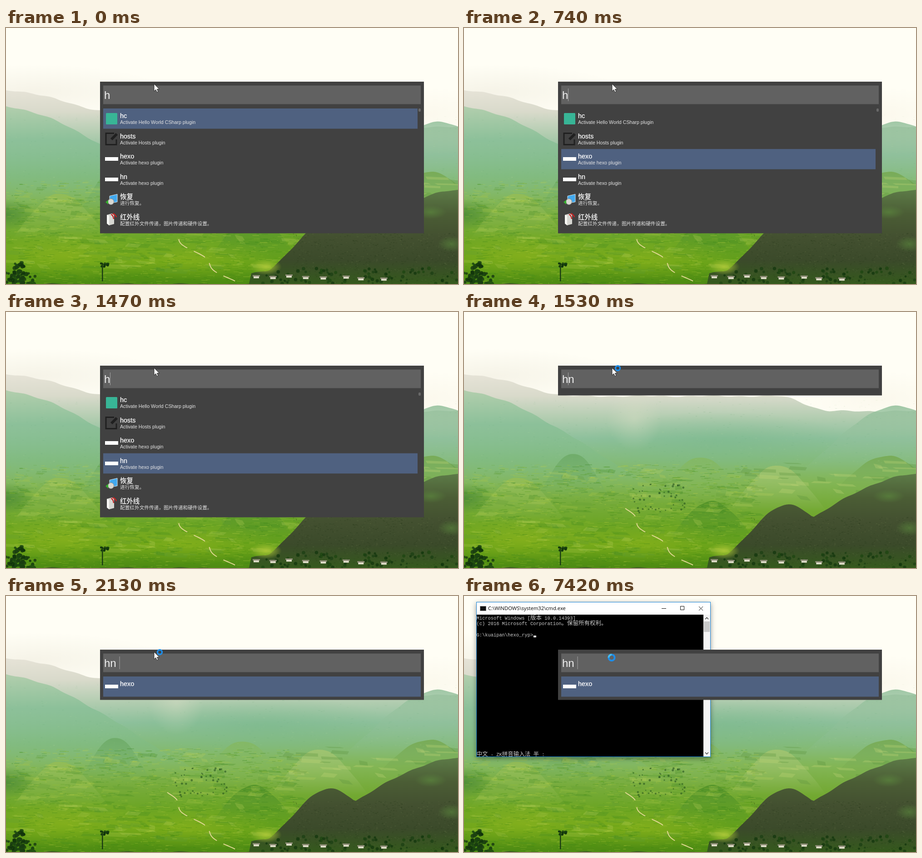
Animation, 995 px wide and 563 px high, one loop 8000 ms. Source, as an HTML page with a canvas:

```html
<!DOCTYPE html>
<html lang="zh">
<head>
<meta charset="utf-8">
<title>Launcher</title>
<style>
  html, body { margin: 0; width: 100%; height: 100%; overflow: hidden; background: #fffef4; }
  canvas, svg { position: absolute; left: 0; top: 0; width: 995px; height: 563px; }
  text { font-family: "Liberation Sans", "Noto Sans CJK SC", "Noto Sans CJK", sans-serif; fill: #fff; white-space: pre; }
  .query { font-size: 24px; fill: #efefef; }
  .title { font-size: 14.4px; stroke: #fff; stroke-width: .25px; }
  .sub { font-size: 10.67px; fill: #e4e4e4; }
  .mono { font-family: "Liberation Mono", "Noto Sans CJK SC", "Noto Sans CJK", monospace; font-size: 10.4px; fill: #ccc; }
  .mono .wide { font-size: 12.5px; }
  .caption { font-family: "Open Sans", "Noto Sans", sans-serif; font-size: 11.2px; fill: #000; }
</style>
</head>
<body>
<canvas id="land" width="995" height="563"></canvas>
<svg viewBox="0 0 995 563">
  <defs>
    <filter id="shadow" x="-10%" y="-10%" width="120%" height="120%">
      <feDropShadow dx="0" dy="3" stdDeviation="6" flood-color="#000" flood-opacity=".4"/>
    </filter>
  </defs>

  <g id="console">
    <rect x="27" y="13" width="516" height="341" fill="#1883d7" filter="url(#shadow)"/>
    <rect x="28" y="14" width="514" height="339" fill="#fff"/>
    <rect x="28" y="41" width="499" height="312"/>
    <rect x="35.5" y="22.5" width="13" height="10" fill="#111" stroke="#888"/>
    <text class="caption" x="53" y="31">C:\WINDOWS\system32\cmd.exe</text>
    <path d="M435 27.5h10M476.5 22.5h8v8h-8zM517 23l9 9m0-9l-9 9" fill="none" stroke="#111"/>
    <rect x="527" y="41" width="15" height="312" fill="#f5f5f5"/>
    <rect x="528" y="56" width="13" height="23" fill="#c9c9c9"/>
    <path d="M531 51l3.5-3.5 3.5 3.5M531 344l3.5 3.5 3.5-3.5" fill="none" stroke="#505050" stroke-width="1.6"/>
    <g id="lines"></g>
    <rect x="153" y="87" width="6" height="4" fill="#eee"/>
    <g id="ime"></g>
  </g>

  <rect id="panel" x="207" y="118" width="713" fill="#414141"/>
  <rect x="214" y="126.5" width="699" height="41" fill="#616161"/>
  <text id="query" class="query" x="216" y="156"></text>
  <rect id="caret" y="133" width="1" height="28" fill="#a5a5a5"/>
  <rect id="mark" x="214" height="44.5" fill="#4f6180"/>
  <g id="menu">
    <rect x="908" y="177" width="5" height="7" rx="2" fill="#696969"/>
    <rect x="220" y="187" width="25" height="25" rx="1.5" fill="#38b596"/>
    <g stroke="#202020" fill="none">
      <path d="M238 231.5H220v25h23V245" stroke-width="3"/>
      <path d="M232 245l12-12" stroke-width="6"/>
    </g>
    <path d="M228 369.5l17-4v17l-17 3z" fill="#42a9ee" stroke="#dce4e8"/>
    <circle cx="231" cy="382" r="6.5" fill="#d8d8d2" stroke="#888"/>
    <path d="M219 383l6-5v10z" fill="#35b02d"/>
    <path d="M222 411l11-3 5 3v20l-11 3-5-4z" fill="#d7d7d2"/>
    <path d="M222 411l5 2v21l-5-4z" fill="#f7f7f4"/>
    <path d="M231 410q5 1 6 10M235 408q6 2 8 8" fill="none" stroke="#c22525" stroke-width="2.5"/>
  </g>
  <g id="single"></g>

  <path id="arrow" d="M326 123v16l3.7-3.4 2.6 5.6 2.6-1.2-2.5-5.4h5z" fill="#fff" stroke="#222" stroke-width=".9"/>
  <circle id="busySmall" cx="338.5" cy="123.5" r="5" fill="none" stroke="#1e8de8" stroke-width="3.4"/>
  <g id="busyLarge" fill="none" stroke-width="4">
    <circle cx="325" cy="135.5" r="6.6" stroke="#1e8de8"/>
    <path d="M318.4 135.5a6.6 6.6 0 0 1 6.6-6.6" stroke="#45bdf3"/>
  </g>
</svg>

<script>
const LOOP = 8000;
const WIDTH = 995, HEIGHT = 563;
const ROW_TOP = 177, ROW_STEP = 44.57;
const $ = id => document.getElementById(id);

// ---- Landscape, painted once ----
const ctx = $('land').getContext('2d');
let seed = 7;
const rand = (a = 0, b = 1) => {
  seed = (seed * 16807) % 2147483647;
  return a + (b - a) * seed / 2147483647;
};
const pick = list => list[Math.floor(rand() * list.length)];
const smooth = x => {
  const k = Math.min(1, Math.max(0, x));
  return k * k * (3 - 2 * k);
};

// Fills everything below a ridge line with colours spread evenly from top to bottom.
function ridge(line, top, bottom, colors) {
  const fill = ctx.createLinearGradient(0, top, 0, bottom);
  colors.forEach((c, i) => fill.addColorStop(i / (colors.length - 1), c));
  ctx.fillStyle = fill;
  ctx.beginPath();
  ctx.moveTo(0, HEIGHT);
  for (let x = 0; x <= WIDTH; x += 5) ctx.lineTo(x, line(x) + Math.sin(x / 9) + Math.sin(x / 23));
  ctx.lineTo(WIDTH, HEIGHT);
  ctx.fill();
}

// A bell-shaped hill that melts into the land below.
function hill(center, top, spread, color, depth = 100) {
  const line = x => top + 200 * (1 - Math.exp(-(((x - center) / spread) ** 2)));
  ridge(line, top, top + depth, [color + 'dd', color + '66', color + '00']);
}

function glow(x, y, rx, ry, color, alpha = '88') {
  ctx.save();
  ctx.translate(x, y);
  ctx.scale(rx, ry);
  const fill = ctx.createRadialGradient(0, 0, 0, 0, 0, 1);
  fill.addColorStop(0, color + alpha);
  fill.addColorStop(1, color + '00');
  ctx.fillStyle = fill;
  ctx.fillRect(-1, -1, 2, 2);
  ctx.restore();
}

function scatter(count, left, top, right, bottom, colors, alpha, paint) {
  ctx.globalAlpha = alpha;
  for (let i = 0; i < count; i++) {
    ctx.fillStyle = pick(colors);
    paint(rand(left, right), rand(top, bottom));
  }
  ctx.globalAlpha = 1;
}

const dash = length => (x, y) => ctx.fillRect(x, y, rand(1, length), rand(.7, 1.8));
const leaf = size => (x, y) => {
  ctx.beginPath();
  ctx.arc(x, y, rand(size / 2, size), 0, 7);
  ctx.fill();
};

function field(x, y) {
  const w = rand(12, 50), h = rand(3, 13), lean = rand(-10, 10);
  ctx.beginPath();
  ctx.moveTo(x + lean, y);
  ctx.lineTo(x + w + lean, y + h * .3);
  ctx.lineTo(x + w, y + h);
  ctx.lineTo(x, y + h * .8);
  ctx.fill();
}

function house(x, y) {
  ctx.fillStyle = '#e1dfcb';
  ctx.fillRect(x - 6, y, 12, 5);
  ctx.fillStyle = '#8f8d78';
  ctx.fillRect(x - 8, y - 2, 16, 3);
}

function trail() {
  ctx.strokeStyle = '#e0d794';
  ctx.lineWidth = 2;
  ctx.setLineDash([28, 16]);
  ctx.beginPath();
  for (let s = 0; s <= 1; s += .02)
    ctx.lineTo(355 + 150 * s ** 1.2 + 9 * Math.sin(14 * s), 432 + 130 * s);
  ctx.stroke();
  ctx.setLineDash([]);
}

function paintLand() {
  ctx.fillStyle = '#fffef5';
  ctx.fillRect(0, 0, WIDTH, HEIGHT);
  glow(60, 140, 300, 60, '#f1eee1', 'aa');
  glow(920, 190, 200, 60, '#f8f4e6');

  const skyline = x => 137 + 48 * smooth(x / 250) + 33 * smooth((x - 690) / 120);
  ridge(skyline, 137, HEIGHT, ['#e6e3d7', '#d9dacb', '#b3cdb1', '#8dc09b', '#84bb7b', '#83b656',
    '#76ab3a', '#6ca524', '#64a019', '#4c8a12']);
  hill(950, 207, 190, '#93c09b', 150);
  ridge(x => 172 + 190 * smooth(x / 560) + .12 * x, 172, 400, ['#b2cead', '#8cc099', '#80bb8399', '#80bb8300']);
  glow(560, 285, 300, 65, '#78b789');
  glow(375, 235, 60, 70, '#dce0c7', '66');

  hill(120, 365, 130, '#95bd55');
  hill(240, 312, 100, '#6daa66');
  hill(520, 320, 130, '#84b861');
  hill(690, 338, 130, '#a3c570');
  hill(930, 316, 160, '#76a950');
  hill(545, 417, 130, '#4f9127');
  glow(0, 410, 70, 35, '#2d742f');
  glow(130, 500, 220, 55, '#b9c91d', '55');
  glow(400, 510, 190, 45, '#b5c81c', '55');

  scatter(500, 0, 190, WIDTH, 340, ['#5da06d', '#b9d3a0'], .13, dash(5));
  scatter(170, 0, 340, 640, 540, ['#b9cf5c', '#3f881f', '#a5c548', '#5f9c35'], .26, field);
  scatter(45, 600, 325, WIDTH, 410, ['#c1d576', '#5b933c'], .3, field);
  scatter(1900, 0, 335, 640, HEIGHT, ['#2d7b12', '#c4d24a', '#48920d', '#9dc332'], .28, dash(17));
  scatter(50, 370, 375, 490, 445, ['#1e4d19'], .55, leaf(2.5));
  trail();

  const shade = x => Math.min(
    357 + 200 * (1 - Math.exp(-(((x - 1000) / 290) ** 2))),
    424 + 150 * (1 - Math.exp(-(((x - 715) / 120) ** 2))));
  ridge(x => x < 540 ? HEIGHT : shade(x), 357, HEIGHT, ['#5c7a47', '#4b5d35', '#435030', '#3b4a2a', '#355a1d']);
  scatter(900, 630, 450, WIDTH, HEIGHT, ['#25371a', '#65724a', '#1e3414'], .28, dash(4));
  glow(935, 405, 35, 15, '#5f9140');
  glow(980, 475, 30, 18, '#5f9140');
  glow(572, 525, 35, 18, '#a8c536', 'ff');

  const trees = ['#10330c', '#1b4510', '#1a3d12'];
  scatter(55, 0, 535, 65, HEIGHT, trees, .85, leaf(5));
  scatter(15, 15, 515, 40, 540, trees, .85, leaf(5));
  scatter(90, 560, 528, WIDTH, HEIGHT, trees, .7, leaf(4));
  scatter(18, 202, 516, 226, 525, trees, .9, leaf(3));
  ctx.fillRect(211, 520, 2.5, 37);
  for (let x = 545; x < 840; x += 40) house(x + rand(-8, 8), 548 + rand(-5, 5));
}

// ---- Text and rows ----
const label = (cls, x, y, body) => `<text class="${cls}" x="${x}" y="${y}">${body}</text>`;
const mono = (y, s) => label('mono', 27.5, y,
  s.replace('>', '&gt;').replace(/[\u3000-\u9fff]+/g, m => `<tspan class="wide">${m}</tspan>`));
const badge = y => `<rect x="218" y="${y}" width="29" height="8" fill="#fff"/>`;

function buildText() {
  const items = [
    ['hc', 'Activate Hello World CSharp plugin'],
    ['hosts', 'Activate Hosts plugin'],
    ['hexo', 'Activate hexo plugin'],
    ['hn', 'Activate hexo plugin'],
    ['恢复', '进行恢复。'],
    ['红外线', '配置红外文件传递，图片传递和硬件设置。'],
  ];
  $('menu').innerHTML += items.map(([title, sub], i) => {
    const y = ROW_TOP + Math.round(i * ROW_STEP);
    return (sub.includes('hexo') ? badge(y + 18) : '') +
      label('title', 251, y + 21, title) + label('sub', 251, y + 34, sub);
  }).join('');
  $('single').innerHTML = badge(195) + label('title', 251, 198, 'hexo');
  $('lines').innerHTML = mono(51.5, 'Microsoft Windows [版本 10.0.14393]') +
    mono(64, '(c) 2016 Microsoft Corporation。保留所有权利。') +
    mono(89, 'G:\\kuaipan\\hexo_ryp>');
  $('ime').innerHTML = mono(351.5, '中文 - ZK拼音输入法 半 :');
}

// ---- Timeline ----
const show = (id, on) => $(id).setAttribute('visibility', on ? 'inherit' : 'hidden');
const set = (id, attrs) => { for (const k in attrs) $(id).setAttribute(k, attrs[k]); };

function render(t) {
  const listOpen = t < 1530;
  const single = t >= 1650;
  const consoleOpen = t >= 7160;
  const keyPresses = Math.max(0, Math.min(3, Math.floor((t - 560) / 180) + 1));
  const selected = listOpen ? keyPresses : 0;

  set('panel', { height: listOpen ? 333.5 : single ? 110.5 : 65.5 });
  set('mark', { y: ROW_TOP + selected * ROW_STEP, width: listOpen ? 692 : 699 });
  set('caret', { x: t < 1590 ? 229 : 249.5 });
  $('query').textContent = listOpen ? 'h' : 'hn';

  show('mark', listOpen || single);
  show('menu', listOpen);
  show('single', single);
  show('caret', (t >= 500 && t < 980) || t >= 1470);
  show('arrow', !consoleOpen);
  show('busySmall', (t >= 1530 && t < 1760) || (t >= 2130 && !consoleOpen));
  show('busyLarge', consoleOpen);
  show('console', consoleOpen);
  show('ime', t >= 7420);
}

paintLand();
buildText();
const start = performance.now();
function tick() {
  render((performance.now() - start) % LOOP);
  requestAnimationFrame(tick);
}
tick();
</script>
</body>
</html>
```
